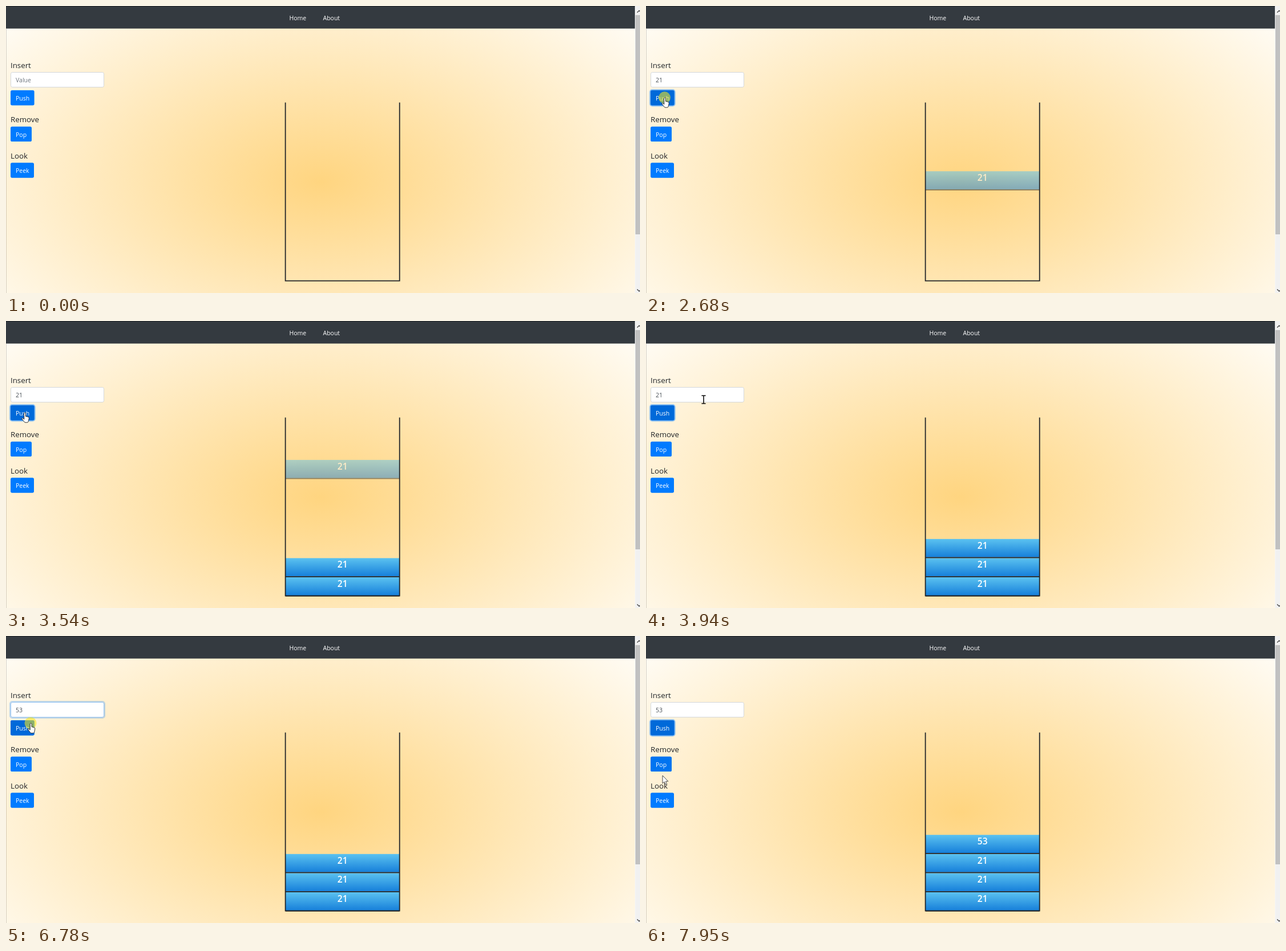
An HTML page for the animation above (8 s loop, 1111 by 504 pixels).

```html
<!DOCTYPE html>
<html lang="en">
<head>
<meta charset="utf-8">
<title>Stack</title>
<style>
  html, body { margin: 0; width: 100%; height: 100%; overflow: hidden; }
  body { background: radial-gradient(ellipse farthest-corner, #ffd580, #fffefb) 0 0 / 1102px 618px no-repeat; }
  svg { display: block; width: 1111px; height: 504px; }
  text { font-family: "Open Sans", "Noto Sans", sans-serif; font-size: 10.5px; fill: #fff; }
  .title { font-size: 13.3px; fill: #212529; }
  .block text { font-size: 15.5px; font-weight: 600; text-anchor: middle; }
  .dark { fill: #0069d9; }
  .ring { fill: none; stroke-width: 2.2; }
</style>
</head>
<body>
<svg viewBox="0 0 1111 504">
  <defs>
    <linearGradient id="blue" x2="0" y2="1">
      <stop stop-color="#5bc2f0"/><stop offset="1" stop-color="#167fda"/>
    </linearGradient>
  </defs>

  <path d="M.5 40V504" stroke="#000" stroke-opacity=".16"/>
  <rect width="1102.3" height="39.6" fill="#343a40"/>
  <rect width="1102.3" height="1" fill="#1d2125"/>
  <text x="496.5" y="25">Home</text>
  <text x="555.5" y="25">About</text>

  <rect x="1102.3" width="9" height="504" fill="#f1f1f1"/>
  <rect x="1103" y="16" width="8" height="385" fill="#c1c1c1"/>
  <path d="M1106 11.5l3.5-3.5 3.5 3.5M1106 497.5l3.5 3.5 3.5-3.5" fill="none" stroke="#505050" stroke-width="1.5"/>

  <text class="title" x="8" y="108.5">Insert</text>
  <text class="title" x="8" y="204">Remove</text>
  <text class="title" x="8" y="267.5">Look</text>

  <rect x="8.5" y="116.5" width="163" height="26" rx="2.7" fill="#fff" stroke="#ced4da" stroke-width=".9"/>
  <g id="inputFocus">
    <rect class="ring" x="7" y="115" width="166" height="29" rx="4" stroke="#007bff" stroke-opacity=".25"/>
    <rect x="8.5" y="116.5" width="163" height="26" rx="2.7" fill="none" stroke="#80bdff" stroke-width=".7"/>
  </g>
  <rect id="selection" x="17" y="123" width="12.5" height="14" fill="#3390ff"/>
  <text id="value" x="17" y="134.3"></text>
  <path id="caret" d="M0 123.5V136.5" stroke="#495057" stroke-width=".8"/>

  <g id="buttons"></g>
  <g id="blocks"></g>
  <path d="M489.6 169.5V482.6H689.7V169.5" fill="none" stroke="#212529" stroke-width="1.8"/>

  <circle id="press" r="10.5" fill="#f2e51e" fill-opacity=".58"/>
  <g id="cursor">
    <path id="arrow" d="M0 0V13.8L3.2 11 5.4 16 7.6 15 5.5 10.2H9.8Z" fill="#fff" stroke="#333" stroke-width=".9"/>
    <path id="hand" d="M-.8 1.6a1.4 1.4 0 0 1 2.8 0V6.6l4 .9q2 .5 1.8 2.6l-.8 4q-.3 2.6-1.6 3.3H.5q-1.5-1.6-5.2-6.4q.2-1.8 1.8-1l2.1 1.8Z" fill="#fff" stroke="#222" stroke-width=".9"/>
    <path id="beam" d="M-3.6-7H3.6M0-7V7M-3.6 7H3.6" fill="none" stroke="#111" stroke-width="1.6"/>
  </g>
</svg>
<script>
const LOOP = 8000, MOVE = 300, FADE = 150, FALL = 700, BLINK = 320;
const DROP_Y = 112, FLOOR_Y = 450, PITCH = 33.6;

// The user's session: pointer moves (start, x, y), clicks, and typed words (start, key interval, text).
const START = [0, 1300, 700];
const MOVES = [
  [20, 274, 142], [500, 119, 129], [1470, 112, 147], [1930, 32.5, 160.8],
  [3560, 101, 138], [5800, 95, 147], [6380, 43, 153], [7620, 29, 245]
];
const CLICKS = [850, 2312, 2750, 3200, 4390, 6790];
const WORDS = [[1470, 180, '21'], [4800, 360, '53']];

const $ = id => document.getElementById(id);
const clamp = v => Math.min(1, Math.max(0, v));
const smooth = p => p * p * (3 - 2 * p);
const lerp = (a, b, p) => a + (b - a) * p;
const show = (id, on) => $(id).setAttribute('visibility', on ? 'visible' : 'hidden');
const alpha = (id, v) => $(id).setAttribute('opacity', v);

const TARGETS = [{ name: 'Input', y: 116, w: 164 }, { name: 'Push', y: 148, w: 41.6 },
  { name: 'Pop', y: 211.7, w: 37 }, { name: 'Peek', y: 275.3, w: 41 }];
const HEIGHT = 26.4;

function pointerAt(t) {
  let [, x, y] = START;
  for (const [start, toX, toY] of MOVES) {
    const p = smooth(clamp((t - start) / MOVE));
    x = lerp(x, toX, p);
    y = lerp(y, toY, p);
  }
  return [x, y];
}

function hoverAt(t) {
  const [x, y] = pointerAt(t);
  return TARGETS.find(b => x >= 8 && x < 8 + b.w && y >= b.y && y < b.y + HEIGHT)?.name;
}

const lastClick = t => CLICKS.filter(c => c <= t).pop();
function focusAt(t) {
  const click = lastClick(t);
  return click && hoverAt(click);
}

function typedAt(t) {
  const word = WORDS.filter(w => w[0] <= t).pop();
  if (!word) return { value: '', time: 0 };
  const [start, gap, text] = word;
  const count = Math.min(text.length, 1 + Math.floor((t - start) / gap));
  return { value: text.slice(0, count), time: start + gap * (count - 1) };
}

// Linear transition: the share of the last FADE ms in which the state held.
function eased(t, state) {
  const steps = 15;
  let held = 0;
  for (let i = 0; i < steps; i++) held += state(t - FADE * i / steps);
  return held / steps;
}

$('buttons').innerHTML = TARGETS.slice(1).map(({ name, y, w }) => {
  const box = `x="8" y="${y}" width="${w}" height="${HEIGHT}" rx="2.7"`;
  return `<rect ${box} fill="#007bff"/><rect id="dark${name}" class="dark" ${box}/>
    <text x="17" y="${y + 18.1}">${name}</text>`;
}).join('') +
  '<rect id="pushFocus" class="ring" x="7" y="147" width="43.6" height="28.4" rx="4" stroke="#268fff" stroke-opacity=".5"/>';

const pushes = CLICKS.filter(c => hoverAt(c) === 'Push');
$('blocks').innerHTML = pushes.map(c => `<g class="block">
  <rect x="490" width="199.5" height="32" fill="url(#blue)"/>
  <rect x="490" y="31.8" width="199.5" height="1.8" fill="#212529"/>
  <text x="589.7" y="17.1">${typedAt(c).value}</text></g>`).join('');
const blocks = [...$('blocks').children];

function drawPointer(t) {
  const [x, y] = pointerAt(t), over = hoverAt(t);
  const shape = over === 'Input' ? 'beam' : over ? 'hand' : 'arrow';
  for (const id of ['arrow', 'hand', 'beam']) show(id, id === shape);
  for (const id of ['cursor', 'press']) $(id).setAttribute('transform', `translate(${x} ${y})`);
  show('press', CLICKS.some(c => t > c - 100 && t < c + 60));
}

function drawForm(t) {
  const { value, time } = typedAt(t), click = lastClick(t) || 0;
  const editing = focusAt(t) === 'Input';
  const selected = editing && value !== '' && click > time;
  const sinceInput = t - Math.max(click, time);
  $('value').textContent = value || 'Value';
  $('value').style.fill = selected ? '#fff' : value ? '#495057' : '#6c757d';
  show('selection', selected);
  show('caret', editing && !selected && sinceInput % (2 * BLINK) < BLINK);
  $('caret').setAttribute('transform', `translate(${17.2 + 6.1 * value.length} 0)`);
  alpha('inputFocus', eased(t, s => focusAt(s) === 'Input'));
  alpha('pushFocus', eased(t, s => focusAt(s) === 'Push'));
  for (const { name } of TARGETS.slice(1))
    alpha('dark' + name, eased(t, s => hoverAt(s) === name || focusAt(s) === name));
}

function drawBlocks(t) {
  pushes.forEach((start, i) => {
    const p = clamp((t - start) / FALL);
    blocks[i].setAttribute('transform', `translate(0 ${lerp(DROP_Y, FLOOR_Y - PITCH * i, p)})`);
    blocks[i].setAttribute('opacity', p);
  });
}

function frame() {
  const t = performance.now() % LOOP;
  drawForm(t);
  drawBlocks(t);
  drawPointer(t);
  requestAnimationFrame(frame);
}
frame();
</script>
</body>
</html>
```
